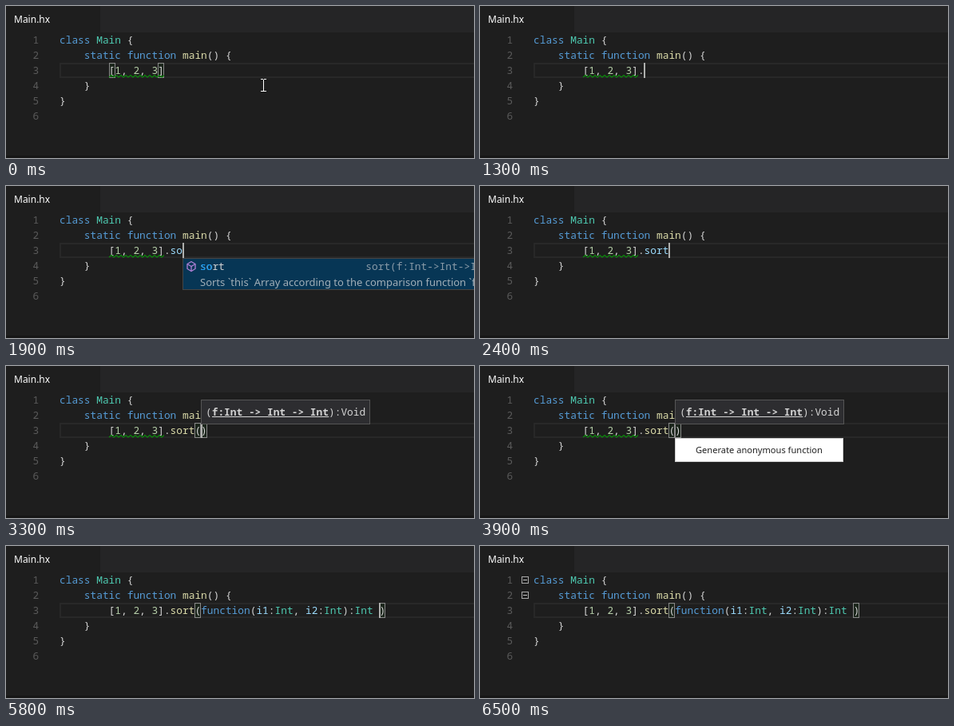
An HTML page with a canvas that plays this animation: 586 by 190 pixels, repeating every 6.6 s.

```html
<!DOCTYPE html>
<html lang="en">
<head>
<meta charset="utf-8">
<title>Editor completion</title>
<style>
html, body { margin: 0; width: 100%; height: 100%; overflow: hidden; background: #1e1e1e; }
canvas { display: block; }
</style>
</head>
<body>
<canvas id="stage" width="586" height="190"></canvas>
<script>
const ctx = document.getElementById('stage').getContext('2d');
const LOOP = 6600, CELL = 7.7, LEFT = 67, ROW = 19, TOP = 33;
const MONO = '12.83px "Noto Sans Mono", monospace';
const sans = size => `${size}px "Noto Sans", sans-serif`;
const FG = '#d4d4d4', KEY = '#569cd6', TYPE = '#4ec9b0', FUNC = '#dcdcaa',
      NUM = '#b5cea8', VAR = '#9cdcfe', WIDGET = '#2d2d30';

const caretOn = [[300, 800], [1300, 2600], [3100, 3600], [4100, 5300], [5800, 6300]];
const mousePath = [[322, 99], [340, 85], [362, 77], [378, 92], [380, 105], [380, 112]];

const colX = col => LEFT + col * CELL;
const rowY = row => TOP + (row - 1) * ROW;
const within = (t, from, to) => t >= from && t < to;

function rect(x, y, w, h, color) {
  ctx.fillStyle = color;
  ctx.fillRect(x, y, w, h);
}

function frame(x, y, w, h, color) {
  ctx.strokeStyle = color;
  ctx.lineWidth = 1;
  ctx.strokeRect(x + .5, y + .5, w - 1, h - 1);
}

function text(str, x, y, color, font = MONO) {
  ctx.font = font;
  ctx.fillStyle = color;
  ctx.fillText(str, x, y);
}

function polyline(points, color, width) {
  ctx.beginPath();
  points.forEach(([x, y]) => ctx.lineTo(x, y));
  ctx.strokeStyle = color;
  ctx.lineWidth = width;
  ctx.stroke();
}

// Draws [string, color] tokens and returns the next free column.
function code(row, col, ...tokens) {
  for (const [str, color = FG] of tokens) {
    text(str, colX(col), rowY(row) + 14, color);
    col += str.length;
  }
  return col;
}

function bracketBox(col) {
  const x = Math.round(colX(col));
  rect(x, 71, 8, ROW, 'rgba(0,100,0,.1)');
  frame(x, 71, 8, ROW, '#888');
}

function squiggle(from, to) {
  const points = [];
  for (let x = from, i = 0; x <= to; x += 3, i++) points.push([x, i % 2 ? 86.5 : 89]);
  polyline(points, '#0b8a0b', 1.1);
}

function cube(x, y) {
  const at = points => points.map(([dx, dy]) => [x + dx, y + dy]);
  const color = '#b180d7';
  polyline(at([[0, -6], [5, -3], [5, 3], [0, 6], [-5, 3], [-5, -3], [0, -6]]), color, 1.3);
  polyline(at([[-5, -3], [0, 0], [5, -3]]), color, 1.3);
  polyline(at([[0, 0], [0, 6]]), color, 1.3);
}

function suggest(x, items, typed, detail, doc) {
  const first = doc ? 38 : ROW;
  const height = first + (items.length - 1) * ROW + 2;
  rect(x, 90, 431, height, WIDGET);
  rect(x + 1, 91, 429, first, '#073655');
  frame(x, 90, 431, height, '#454545');
  items.forEach((name, i) => {
    const y = 91 + (i ? first + (i - 1) * ROW : 0);
    cube(x + 11, y + 9.5);
    text(name, x + 22, y + 14, FG);
    if (typed && name.startsWith(typed)) text(typed, x + 22, y + 14, '#0097fb');
  });
  text(detail, x + 429.5 - detail.length * CELL, 105, '#8a9ba8');
  if (doc) text(doc, x + 22, 125, '#a2afb8', sans(13));
}

function signature() {
  rect(244, 42, 212, 31, WIDGET);
  frame(244, 42, 212, 31, '#555');
  const param = 'f:Int -> Int -> Int';
  text('(', 250, 62, FG);
  text(param, 250 + CELL, 62, FG, 'bold ' + MONO);
  rect(258, 63, param.length * CELL, 1, FG);
  text('):Void', 250 + (param.length + 1) * CELL, 62, FG);
}

function actionMenu(selected) {
  rect(244, 90, 211, 30, '#fff');
  frame(244, 90, 211, 30, '#ccc');
  if (selected) rect(245, 94, 209, 23, '#e4e4e4');
  text('Generate anonymous function', 270, 109, '#222', sans(11.1));
}

function foldIcon(y) {
  frame(52, y, 9, 9, '#a8a8a8');
  rect(54, y + 4, 5, 1, '#c5c5c5');
}

function mouse([x, y]) {
  rect(x, y - 7, 1, 15, '#fff');
  for (const end of [y - 8, y + 7]) {
    rect(x - 3, end, 3, 1, '#fff');
    rect(x + 1, end, 3, 1, '#fff');
  }
}

function draw(now) {
  const t = Math.floor(now % LOOP / 100) * 100;
  const letters = Math.max(0, Math.min(4, (t - 1700) / 100));
  const word = 'sort'.slice(0, letters);
  const called = t >= 3100, filled = t >= 4700;

  rect(0, 0, 586, 190, '#1e1e1e');
  rect(118, 0, 468, 33, '#252526');
  rect(0, 187, 586, 3, '#171717');
  text('Main.hx', 10, 21, '#fff', sans(12));

  rect(LEFT, 71, 519, 2, '#282828');
  rect(LEFT, 88, 519, 2, '#282828');
  rect(LEFT, 71, 2, ROW, '#282828');
  for (let n = 1; n <= 6; n++) text(n, 33.5, rowY(n) + 14, '#5a5a5a');

  const matched = t < 1300 ? [8, 16] : called ? [22, filled ? 52 : 23] : [];
  matched.forEach(bracketBox);

  code(1, 0, ['class ', KEY], ['Main ', TYPE], ['{']);
  code(2, 4, ['static ', KEY], ['function ', KEY], ['main', FUNC], ['() {']);
  let col = code(3, 8, ['['], ['1', NUM], [', '], ['2', NUM], [', '], ['3', NUM], [']']);
  if (t >= 1300) col = code(3, col, ['.'], [word, called ? FUNC : VAR]);
  if (called) col = code(3, col, ['(']);
  if (filled) {
    col = code(3, col, ['function', KEY], ['('], ['i1', VAR], [':'], ['Int', TYPE], [', '],
      ['i2', VAR], [':'], ['Int', TYPE], ['):'], ['Int', TYPE], [' ']);
  }
  if (called) code(3, col, [')']);
  code(4, 4, ['}']);
  code(5, 0, ['}']);

  if (t < 4900) squiggle(129, 198);
  const caretX = Math.floor(colX(col));
  if (caretOn.some(([from, to]) => within(t, from, to))) rect(caretX, 71, 2, ROW, '#aeafad');

  if (within(t, 1400, 1800)) {
    suggest(caretX, ['concat', 'copy', 'filter', 'indexOf', 'insert', 'iterator'], '',
      'concat(a:Array<Int>):Array<Int>',
      t >= 1500 && 'Returns a new Array by appending the elements of `a` to the end');
  } else if (t === 1800) {
    suggest(caretX, ['shift', 'slice', 'sort', 'splice'], word, 'shift():Null<Int>',
      'Removes the first element of `this` Array and returns it.');
  } else if (within(t, 1900, 2400)) {
    suggest(caretX, ['sort'], word, 'sort(f:Int->Int->Int):Void',
      'Sorts `this` Array according to the comparison function `f`');
  }

  if (within(t, 3300, 4700)) signature();
  if (within(t, 3900, 4600)) actionMenu(t >= 4200);

  if (t >= 6200) {
    ctx.globalAlpha = (t - 6100) / 400;
    foldIcon(38);
    foldIcon(57);
    ctx.globalAlpha = 1;
  }
  if (t < 1300) mouse(mousePath[Math.min(5, t / 100)]);
}

const start = performance.now();
function tick() {
  draw(performance.now() - start);
  requestAnimationFrame(tick);
}
tick();
</script>
</body>
</html>
```
